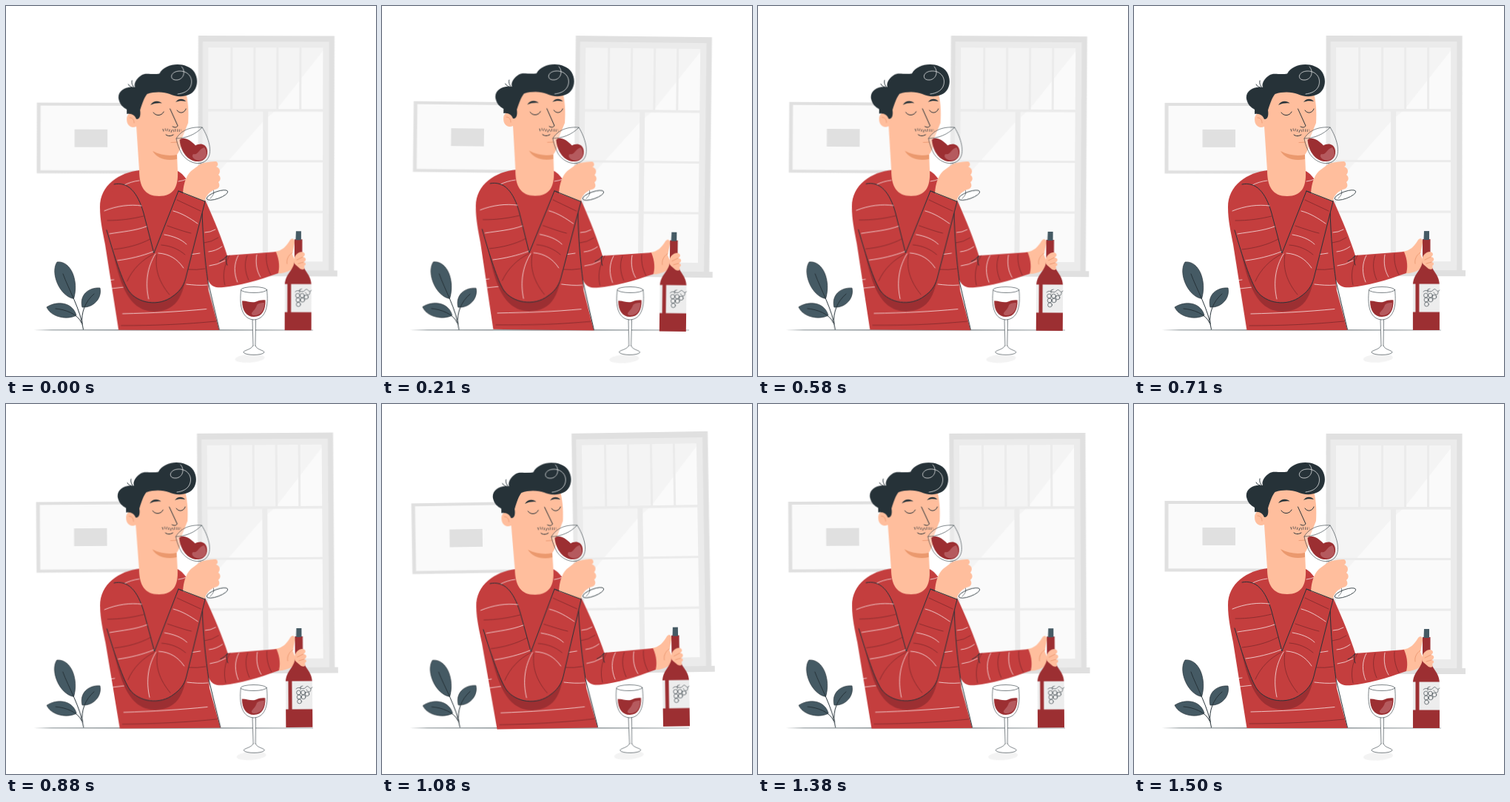
Recreate the animation shown at these times as an HTML page. Size 500 by 500 pixels, loop 1.54 s.

```html
<!DOCTYPE html>
<html lang="en">
<head>
<meta charset="utf-8">
<title>Wine tasting</title>
<style>
html, body { margin: 0; width: 100%; height: 100%; overflow: hidden; background: #fff; }
svg { display: block; width: 100vw; height: 100vh; }
.sway { transform-origin: 250px 250px; animation: sway 1540ms linear -45ms infinite; }
.plant { transform-origin: 91px 391px; }
.glass { transform-origin: 335px 425px; }
@keyframes sway {
  25% { transform: rotate(1deg); }
  75% { transform: rotate(-1deg); }
}
.frame { fill: #e0e0e0; }
.sash { fill: #ebebeb; }
.pane { fill: #fafafa; }
.shade { fill: #f4f4f4; }
.skin { fill: #ffbe9d; }
.knit { fill: #c43e3e; }
.dark { fill: #9c2f32; }
.hair { fill: #263238; }
.leaf { fill: #455a64; stroke: #263238; stroke-width: .7; }
.clear { fill: #fff; fill-opacity: .3; }
.shine { fill: #b55a5e; }
.ink, .light, .deep, .fold { fill: none; stroke-linecap: round; stroke-linejoin: round; }
.ink { stroke: #263238; stroke-width: 1; }
.thin { stroke-width: .6; }
.light { stroke: #fff; stroke-width: .7; }
.deep { stroke: #6f2528; stroke-width: .65; }
.fold { stroke: #e8946d; stroke-width: .8; }
</style>
</head>
<body>
<svg viewBox="0 0 500 500">
  <g class="sway">
    <!-- window -->
    <path class="frame" d="M259.500 40H443.500V357H448V365H262V357H259.500Z"/>
    <path class="sash" d="M265.500 48H436.500V357H265.500Z"/>
    <path class="frame" d="M436.500 48H443V357H436.500Z"/>
    <path class="pane" d="M273 56H428V345H273Z"/>
    <path class="shade" d="M273 56H428V60L366 139L348 155L273 240Z"/>
    <path class="sash" d="M303 56h3v84h-3zM334 56h3v84h-3zM365 56h3v84h-3zM396 56h3v84h-3zM273 139H428v3.500H273zM347 140h7V345h-7zM273 208H428v3H273zM273 276.500H428v3H273z"/>
    <!-- wall picture -->
    <path class="frame" d="M41.500 131H205V226.500H41.500Z"/>
    <path class="pane" d="M46.500 135H201V222.500H46.500Z"/>
    <path class="frame" d="M92.500 167H137V191H92.500Z"/>
    <ellipse cx="330" cy="476" rx="20" ry="5.800" fill="#f3f3f3" transform="rotate(-4 330 476)"/>
  </g>

  <path fill="#5a666b" d="M37 438L62 437.400L230 437.300L415 437.700V438.200L230 438.400L62 438.300Z"/>

  <g class="sway plant">
    <path class="leaf" d="M91.500 395.500C72 392 59.500 360 69 346C88 344 98.500 372 91.500 395.500Z"/>
    <path class="leaf" d="M103 407C99 391 111 380 127 381C130 395 118 408 103 407Z"/>
    <path class="leaf" d="M95 418C85 424 62 422 55 407C69 398 90 400 95 418Z"/>
    <path class="ink" d="M77 362C84 382 101 410 104.500 437M119 389C107 399 101 415 103 430M67 409C80 410 97 416 102 428"/>
  </g>

  <g class="sway">
    <!-- far hand and bottle -->
    <path class="skin" d="M362 332C374 331 379 324 384 316C387 312 391 315 390 320L387 335L393 350C387 357 376 362 366 361Z"/>
    <path class="fold" d="M387 333C381 337 379 343 380 348"/>
    <path class="dark" d="M390 315H400.500V344C401 358 413 361 413 378V438H377V378C377 361 389 358 390 344Z"/>
    <path d="M392 304H399V316H391.500Z" fill="#455a64"/>
    <path fill="#ededed" d="M377 375.500H380.500V413.500H377ZM385.500 375.500H413V413.500H385.500Z"/>
    <g class="ink thin">
      <circle cx="394.500" cy="391" r="2.900"/><circle cx="400.500" cy="391" r="2.900"/>
      <circle cx="406" cy="393" r="2.800"/><circle cx="395" cy="397" r="2.900"/>
      <circle cx="401" cy="397" r="2.900"/><circle cx="395.500" cy="403" r="2.900"/>
      <path d="M391 386C396 381 400 389 404 384S409 389 413 384M397 387V383L400 382M405 387C408 392 411 391 411 386"/>
    </g>
    <path class="skin" d="M393 335C397 331 403 331 404 335C404 338 401 339 401 339C406 339 407 344 402 346C406 346 406 350 403 351C405 355 402 357 398 355L391 349C388 345 389 339 393 335Z"/>
    <path class="fold" d="M401 339L393 343M402 346L395 348"/>

    <!-- far sleeve and torso -->
    <path class="knit" d="M258 250L269 262C282 290 292 315 299 337L365 332C370 344 370 354 368 361C340 371 315 378 294 380C278 382 272 376 268 350Z"/>
    <path class="knit" d="M181 222C153 225 127 242 127 272C127 290 131 306 134 322L152.500 438H288.500L274 384L265 260L247 239C242 231 238 226 232 223Z"/>
    <path class="ink" d="M265 276C266 312 269 344 273 372L288.500 437M289 345C293 343 296 341 299 337C297 341 297 345 299 350"/>
    <path class="light" d="M160 242C166 239 172 237 180 236M233 237Q240 236 244 234M139 371L146 370M143 382L160 380M158 416C198 415 235 413 271 409.500M238 336C246 337 254 335 262 334M244 376C253 377 262 378 272 377M269 306Q276 306 283 302M274 332Q284 331 292 325M275 351Q285 350 296 344M314 337C308 348 308 361 313 373M339 336C337 347 339 358 344 366"/>
    <path class="deep" d="M156 432C202 432 244 430 284 426M268 320Q278 319 287 313M246 356Q258 357 269 355M326 337C322 347 323 359 328 370M352 335C351 345 354 356 358 363M302 337C294 352 293 365 296 377"/>

    <!-- head and neck -->
    <path class="skin" d="M177 145C171 142 163 145 163 153C163 161 168 166 176 163L180 222C180 244 187 257 207 257C226 257 233 245 232 224L231 201C236 194 238 185 238 178L246 158C247 142 246 128 242 114L190 112C181 125 178 136 177 145Z"/>
    <path fill="#eb996e" d="M198 196C209 202 221 203 231 201V207C216 210 204 206 198 196Z"/>
    <path class="fold" d="M167 151C171 151 173 154 173 158M223 184.500L232 184"/>
    <path class="hair" d="M176 153C181 154 182 147 181 141C184 131 187 123 190.500 119C201 115.500 213 116 221 119C231 124 249 124 255.500 112C261 101 257 86 244 81.500C231 76 213 80 207 91.500C197 93.500 188 89.500 183 93.500C176 98 172 105 174 110C160 108 150 116 152 126C154 134 158 137 163 140V146C170 145 174 148 176 153Z"/>
    <path class="ink" d="M174 111C171 109 169 105 170 101M173 111C170 110 166 109 165 106"/>
    <path class="light" d="M237 82C243 88 240 99 231 100C220 101 221 89 233 88C246 87 254 98 249 109C246 115 240 118 232 119"/>
    <path class="hair" d="M195 134C198 128 206 127 210.500 131.500C205 131 200 131.500 195 134ZM229 130C232 125 239 124 243 129C238 127.800 233 128 229 130Z"/>
    <path class="ink" d="M199 144C202 149 210 149 213 143M231 141C234 146 241 145 243 139M221.500 139L232 162C230 164.500 228 164.500 225 163M216 174C219 176.500 223 176 226 174"/>
    <path d="M212 168C218 165.500 222 170 225 169C229 167 232 169 237 168" fill="none" stroke="#263238" stroke-width="3.600" stroke-dasharray=".7 2.100"/>

    <!-- near sleeve -->
    <path class="dark" d="M144 330C153 368 163 413 201 413C233 412 242 390 246 345Z"/>
    <path class="knit" d="M146 241C165 237 178 252 186 280L200 334L233 250L269 264L243 368C240 380 233 387 226 392C207 407 178 402 166 385C157 371 147 340 136 303Z"/>
    <path class="ink" d="M146 241C165 237 178 252 186 280L200 334L233 250L269 264L243 368C240 380 233 387 226 392C207 407 178 402 166 385C157 371 147 340 136 303"/>
    <path class="light" d="M133 277C150 270 168 268 183 270M140 308C158 305 174 304 190 298M151 344C167 342 184 338 199 332M193 396C188 374 191 353 202 335M206 334C221 335 232 342 240 354M214 309C226 311 237 315 244 322M226 277C238 280 249 287 259 294"/>
    <path class="deep" d="M137 290C154 290 170 288 186 284M146 329C164 327 180 323 195 315M164 372C171 356 184 343 200 335M221 390C206 372 201 354 204 336M218 297C230 301 241 305 250 307M210 323C223 324 234 329 242 336M231 262L263 277"/>

    <!-- tasting glass and near hand -->
    <path class="clear" d="M230 179C238 166 252 163 265 164C274 178 280 199 271 208C262 217 245 212 237 199Z"/>
    <path class="dark" d="M234.500 181C239 176 248 180 256 188.500C262 185 269 186 271.500 193C274 202 269 209.500 260 210C247 211 236 198 234.500 181Z"/>
    <path class="shine" d="M253 200C260 202 260 193 268 191C274 200 270 209 259 208.500C253 207 250 203 253 200Z"/>
    <path class="ink thin" d="M230 179C238 166 252 163 265 164C274 178 280 199 271 208C262 217 245 212 237 199C234 193 231 186 230 179C242 179 256 174 265 164M263 213L266 218M267 212L270 216"/>
    <ellipse cx="285.500" cy="255.500" rx="15" ry="4.700" fill="#fff" stroke="#263238" stroke-width=".8" transform="rotate(-20 285.500 255.500)"/>
    <path class="ink thin" d="M280 248C282 253 280 256 276 260"/>
    <path class="skin" d="M239 253C240 240 243 230 250 223L262 214C268 211 278 210 284 210C287 212 287 216 284 217C290 219 290 225 287 228C291 231 290 236 287 238C290 243 288 247 282 248C275 251 270 256 268.500 264Z"/>
    <path class="ink" d="M233 250L269 264"/>
  </g>

  <!-- glass on the table -->
  <g class="sway glass">
    <path fill="#fff" d="M317.500 384C315 406 319 422 333 424L334 459C331 465 321 465 321 468C323 473 347 473 349 468C349 465 339 465 337 459V424C351 422 355 406 352.500 384C347 378 323 378 317.500 384Z"/>
    <path class="dark" d="M319 398.500C326 398 331 402 338 399.500C342 397.500 347 397 350.500 397.500C351 411 346 420 335 420C325 420 319 412 319 398.500Z"/>
    <path class="shine" d="M339 404C342 401 346 401 349 401C349.500 412 343 419 334 418C328 415 337 412 339 404Z"/>
    <g class="ink thin">
      <ellipse cx="335" cy="383.500" rx="17.500" ry="4"/>
      <path d="M317.500 384C315 406 319 423 335 424C351 423 355 406 352.500 384M333 424L334 459M337.500 424L337 459"/>
      <path d="M334 459C331 465 321 465 321 468C323 472.500 347 472.500 349 468C349 465 339 465 337 459"/>
    </g>
  </g>
</svg>
</body>
</html>
```
